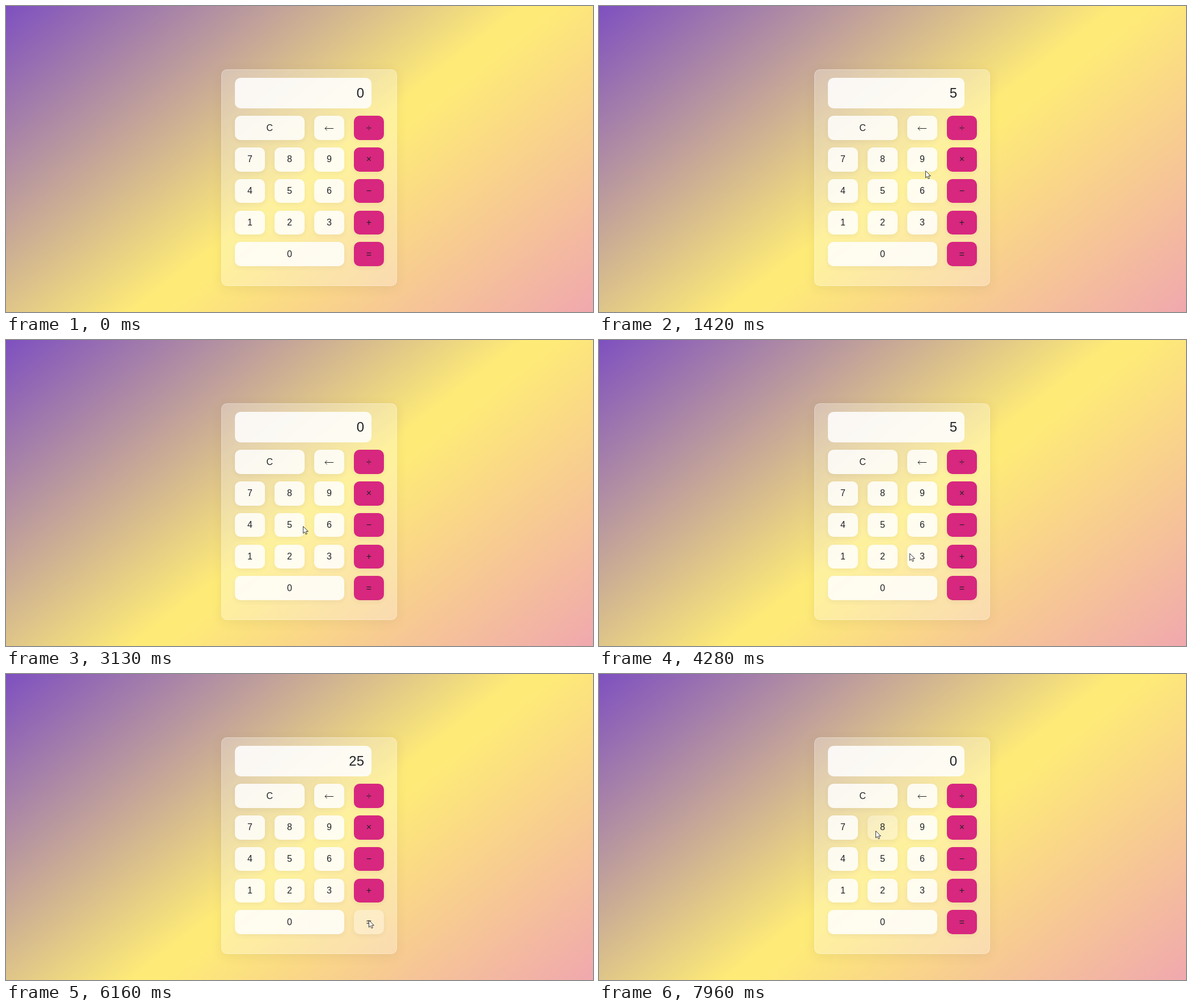
Animation, 1036 px wide and 541 px high, one loop 8 s. Source, as an HTML page:

```html
<!DOCTYPE html>
<html lang="en">
<head>
<meta charset="utf-8">
<title>Calculator</title>
<style>
html, body { margin: 0; width: 100%; height: 100%; overflow: hidden; }
body {
  position: relative;
  background: linear-gradient(142deg, #7e50c0 0%, #feeb77 53%, #feeb77 56%, #f0a8ae 100%);
  font-family: "Liberation Sans", Arial, sans-serif;
  color: #222;
  cursor: none;
}
.panel, .key, #screen, #cursor { position: absolute; box-sizing: border-box; }
.panel {
  left: 380px; top: 112px; width: 310px; height: 383px;
  border: 1px solid rgba(255, 255, 255, .3);
  border-radius: 10px;
  background: rgba(255, 255, 255, .29);
  box-shadow: 0 4px 20px rgba(60, 50, 60, .08);
}
#screen {
  left: 404px; top: 127px; width: 241px; height: 54px;
  padding-right: 13px;
  border-radius: 10px;
  background: rgba(255, 255, 255, .86);
  font-size: 24px; line-height: 54px; text-align: right;
}
.key {
  display: flex; align-items: center; justify-content: center;
  height: 42.7px;
  border-radius: 10px;
  background: rgba(255, 255, 255, .84);
  box-shadow: 0 3px 9px rgba(60, 50, 60, .06);
  font-size: 16px;
}
.op { background: #d7277f; }
.key.hover { background: rgba(255, 255, 255, .33); }
.key svg { width: 16px; height: 8px; fill: none; stroke: #222; }
#cursor { left: 0; top: 0; width: 12px; height: 17px; }
</style>
</head>
<body>
<div class="panel"></div>
<div id="screen"></div>
<svg id="cursor" viewBox="0 0 12 17">
  <path d="M.5 .5V12.9L3.3 10.2L5.2 14.5L7.3 13.6L5.4 9.4H9.3Z" fill="#fff" stroke="#222" stroke-width=".9"/>
</svg>
<script>
const LOOP = 8000, HOVER_LAG = 50;
const COL = 70, ROW = 55.75, KEY_W = 52.8, KEY_H = 42.7;
const ARROW = '<svg viewBox="0 0 16 8"><path d="M16 4.5H1M4.5 1L1 4.5L4.5 8"/></svg>';
const cursor = document.getElementById('cursor');
const display = document.getElementById('screen');

// A space widens the key before it by one column
const keys = [];
['C ←÷', '789×', '456−', '123+', '0  ='].forEach((line, row) => {
  for (const { 0: cell, index: col } of line.matchAll(/\S */g)) {
    const el = document.createElement('div');
    const x = 404 + col * COL, y = 194.3 + row * ROW;
    const w = KEY_W + (cell.length - 1) * COL;
    el.className = col === 3 ? 'key op' : 'key';
    el.innerHTML = cell === '←' ? ARROW : cell.trim();
    el.style.cssText = `left:${x}px;top:${y}px;width:${w}px`;
    document.body.insertBefore(el, cursor);
    keys.push({ el, x, y, w });
  }
});

// Pointer moves: start, end, x, y
const entry = [618, 534];
const moves = [
  [150, 520, 505, 280],
  [520, 950, 508, 322],
  [1100, 1740, 643, 260],
  [1840, 1970, 635, 263],
  [2130, 2900, 534, 328],
  [3000, 3360, 496, 332],
  [4080, 4590, 665, 479],
  [4690, 5480, 640, 435],
  [6160, 6570, 469.5, 195],
  [6710, 7060, 475, 212],
  [7570, 7960, 487.5, 277]
];
const readings = [[0, '0'], [1000, '5'], [2130, '0'], [3860, '5'], [5510, '25'], [7570, '0']];

const ease = u => u * u * u * (10 - 15 * u + 6 * u * u);

function position(t) {
  let [x, y] = entry;
  for (const [from, to, nx, ny] of moves) {
    const k = ease(Math.min(1, Math.max(0, (t - from) / (to - from))));
    x += (nx - x) * k;
    y += (ny - y) * k;
  }
  return [x, y];
}

function draw(t) {
  const [x, y] = position(t);
  const shown = t >= moves[0][0];
  cursor.style.visibility = shown ? 'visible' : 'hidden';
  cursor.style.transform = `translate(${Math.round(x)}px, ${Math.round(y)}px)`;

  const [hx, hy] = position(t - HOVER_LAG);
  for (const k of keys) {
    const over = hx >= k.x && hx < k.x + k.w && hy >= k.y && hy < k.y + KEY_H;
    k.el.classList.toggle('hover', shown && over);
  }

  const text = readings.filter(r => r[0] <= t).pop()[1];
  if (display.textContent !== text) display.textContent = text;
}

const start = performance.now();
function tick() {
  draw((performance.now() - start) % LOOP);
  requestAnimationFrame(tick);
}
tick();
</script>
</body>
</html>
```
